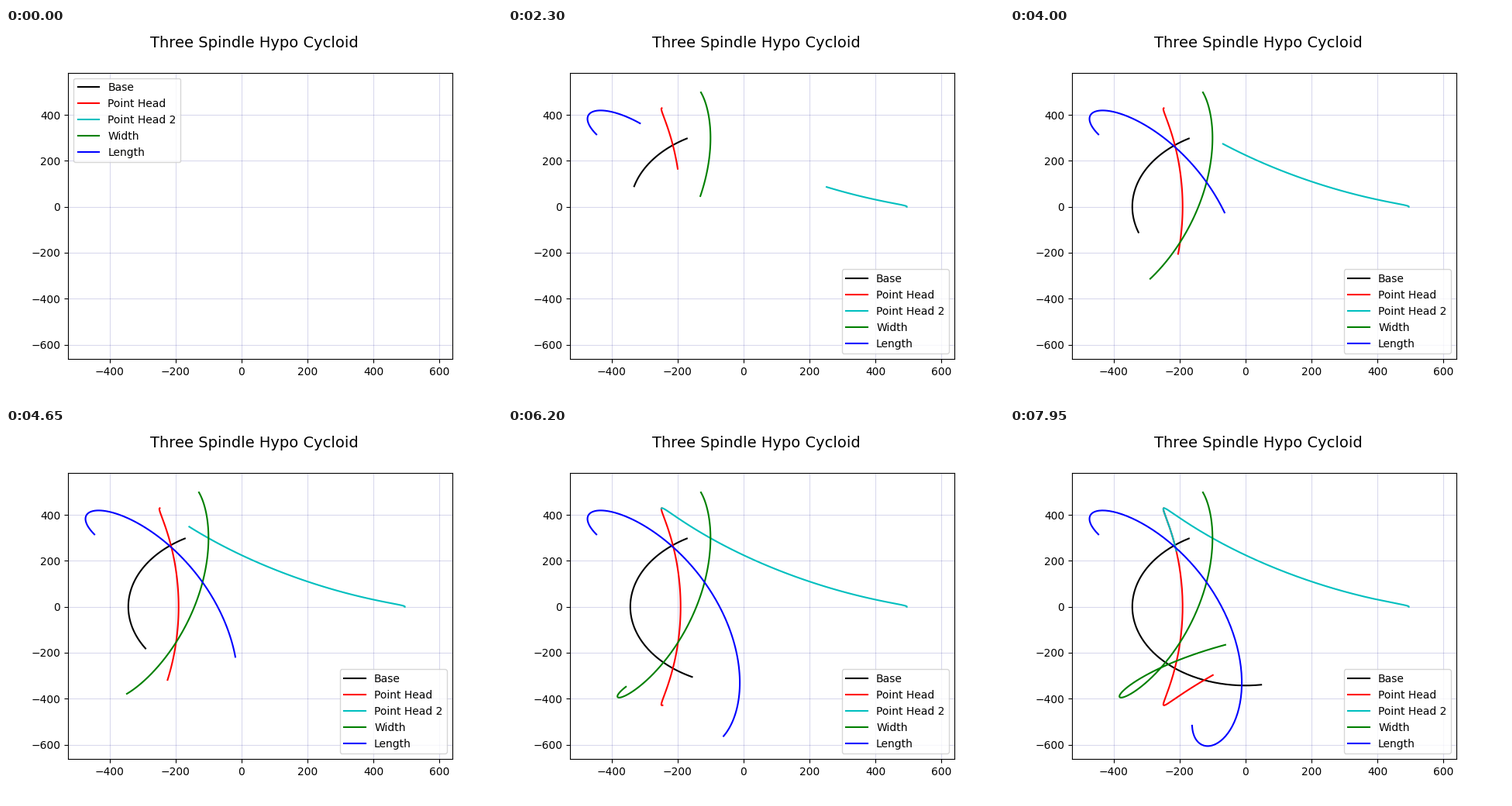
A matplotlib script for the animation above (8000 ms loop, 640x480 px).

```python
import numpy as np
import matplotlib.pyplot as plt
from matplotlib.animation import FuncAnimation

FRAMES, INTERVAL = 160, 50
INCH = 25.4
BASE = 13.5 * INCH
HEAD = 6 * INCH
WIDTH = 5.4 * INCH
LENGTH = 9 * INCH


def arm(degrees, offset):
    """Point carried by a spindle that turns backwards twice as fast."""
    turn = np.exp(1j * np.radians(degrees))
    return BASE * turn + offset * turn ** -2


# label, colour, start angle, offset from the spindle axis
PARTS = [
    ("Base", "k", 120, 0),
    ("Point Head", "r", 120, HEAD),
    ("Point Head 2", "c", -1, HEAD),
    ("Width", "g", 120, HEAD - 1j * WIDTH),
    ("Length", "b", 120, HEAD + 1j * LENGTH),
]

fig, ax = plt.subplots(figsize=(6.4, 4.8), dpi=100)
fig.suptitle("Three Spindle Hypo Cycloid", fontsize=14)
ax.grid(color="darkblue", alpha=0.15)

step = np.arange(FRAMES)
paths = [arm(start + step, offset) for _, _, start, offset in PARTS]
lines = [ax.plot([], [], color=color, label=label)[0]
         for label, color, _, _ in PARTS]

# Limits hold the whole closed curves with a 5 % margin
whole = np.concatenate([arm(np.arange(360), part[3]) for part in PARTS])


def padded(values):
    low, high = values.min(), values.max()
    pad = 0.05 * (high - low)
    return low - pad, high + pad


ax.set_xlim(padded(whole.real))
ax.set_ylim(padded(whole.imag))

first_key = ax.legend(loc="upper left")
ax.add_artist(first_key)
main_key = ax.legend(loc="lower right")


def update(n):
    for line, path in zip(lines, paths):
        line.set_data(path.real[:n], path.imag[:n])
    first_key.set_visible(n == 0)
    main_key.set_visible(n > 0)
    return [*lines, first_key, main_key]


anim = FuncAnimation(fig, update, frames=FRAMES, interval=INTERVAL,
                     init_func=lambda: update(0), repeat=True, repeat_delay=0)
plt.show()
```
